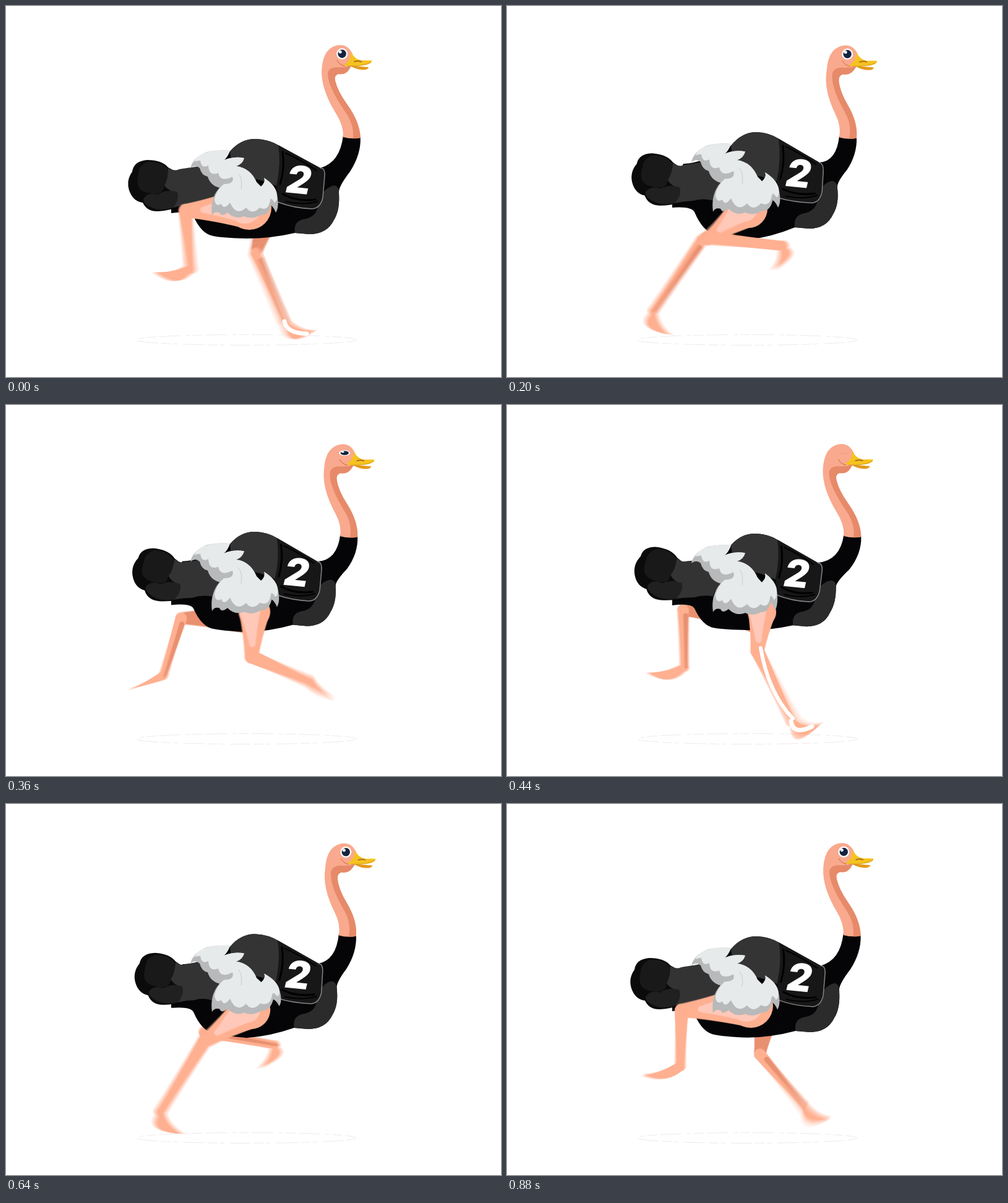
Recreate the animation shown at these times as an HTML page with a canvas. Size 800 px wide and 600 px high, loop 920 ms.

```html
<!DOCTYPE html>
<html lang="en">
<head>
<meta charset="utf-8">
<title>Running ostrich</title>
<style>
  html, body { margin: 0; width: 100%; height: 100%; overflow: hidden; background: #fff; }
  canvas { display: block; }
</style>
</head>
<body>
<canvas id="stage" width="800" height="600"></canvas>
<script>
const W = 800, H = 600, LOOP = 920, STEP = 40;
const SKIN = '#f9a98d', SHADE = '#e68a69', LIGHT = '#fac6b2';
const ctx = document.getElementById('stage').getContext('2d');

const newLayer = () => {
  const c = document.createElement('canvas');
  c.width = W;
  c.height = H;
  return c.getContext('2d');
};
const sum = newLayer(), pass = newLayer();

// time, hip x y r, hock x y, ankle x y, sole x y, toe x y
const STRIDE = [
  [0,   393, 326, 36, 290, 331, 298, 425, 275, 458, 239, 430],
  [60,  395, 328, 33, 307, 341, 368, 411, 350, 440, 302, 432],
  [200, 390, 328, 31, 326, 375, 446, 388, 474, 402, 429, 428],
  [270, 390, 333, 28, 371, 403, 492, 396, 520, 392, 524, 431],
  [420, 410, 335, 24, 409, 405, 480, 488, 480, 528, 524, 508],
  [440, 412, 335, 23, 404, 397, 460, 511, 462, 562, 507, 515],
  [460, 412, 335, 23, 404, 400, 451, 510, 455, 556, 500, 525],
  [520, 398, 340, 27, 352, 415, 356, 512, 372, 560, 418, 526],
  [660, 395, 332, 32, 315, 379, 236, 494, 208, 522, 264, 532],
  [730, 388, 338, 31, 291, 363, 223, 463, 196, 462, 181, 499],
  [880, 394, 326, 36, 282, 334, 280, 424, 255, 454, 218, 438]
];

// time, hump, belly, rump, chest x, tail x y, feather tip
const BOB = [
  [0,   0,   0,   0,   0, 0, 0,   0],
  [200, -11, 3,   -9,  -3, 3, -14, 2],
  [280, -12, -3,  -11, -3, 4, -18, 6],
  [440, -7,  -12, -11, -8, 7, -25, -3],
  [520, -2,  -5,  -7,  -7, 9, -19, -4],
  [720, -6,  6,   -4,  0,  9, -6,  10],
  [880, -1,  2,   0,   -1, 2, 0,   1]
];

const clamp = v => Math.max(0, Math.min(1, v));
const mix = (a, b, k) => a + (b - a) * k;
const mixPt = (a, b, k) => [mix(a[0], b[0], k), mix(a[1], b[1], k)];

// Smooth periodic interpolation through rows of keys
function sample(keys, time) {
  const n = keys.length, t = ((time % LOOP) + LOOP) % LOOP;
  let i = n - 1;
  while (keys[i][0] > t) i--;
  const row = j => keys[(j + n) % n];
  const at = j => row(j)[0] + Math.floor(j / n) * LOOP;
  const [t0, t1, t2, t3] = [at(i - 1), at(i), at(i + 1), at(i + 2)];
  const d = t2 - t1, k = (t - t1) / d, k2 = k * k, k3 = k2 * k;
  return row(i).slice(1).map((b, j) => {
    const a = row(i - 1)[j + 1], c = row(i + 1)[j + 1], e = row(i + 2)[j + 1];
    const m1 = (c - a) / (t2 - t0) * d, m2 = (e - b) / (t3 - t1) * d;
    return b * (2 * k3 - 3 * k2 + 1) + m1 * (k3 - 2 * k2 + k) +
           c * (3 * k2 - 2 * k3) + m2 * (k3 - k2);
  });
}

function disc(g, [x, y], r, color) {
  g.fillStyle = color;
  g.beginPath();
  g.arc(x, y, Math.max(r, 0), 0, 7);
  g.fill();
}

// Tapered limb between two round ends; pinch narrows the middle
function taper(g, a, ra, b, rb, color, pinch = 1) {
  const len = Math.hypot(b[0] - a[0], b[1] - a[1]) || 1;
  const nx = -(b[1] - a[1]) / len, ny = (b[0] - a[0]) / len;
  const m = mixPt(a, b, .55), rm = mix(ra, rb, .55) * pinch;
  disc(g, a, ra, color);
  disc(g, b, rb, color);
  g.beginPath();
  g.moveTo(a[0] + nx * ra, a[1] + ny * ra);
  g.quadraticCurveTo(m[0] + nx * rm, m[1] + ny * rm, b[0] + nx * rb, b[1] + ny * rb);
  g.lineTo(b[0] - nx * rb, b[1] - ny * rb);
  g.quadraticCurveTo(m[0] - nx * rm, m[1] - ny * rm, a[0] - nx * ra, a[1] - ny * ra);
  g.fill();
}

function joints(phase) {
  const [hx, hy, r, kx, ky, ax, ay, cx, cy, tx, ty] = sample(STRIDE, phase);
  return { hip: [hx, hy], r, hock: [kx, ky], ankle: [ax, ay], sole: [cx, cy], toe: [tx, ty] };
}

function drawFoot(g, { ankle, sole, toe }, r) {
  const len = Math.hypot(toe[0] - ankle[0], toe[1] - ankle[1]) || 1;
  let nx = -(toe[1] - ankle[1]) / len * r, ny = (toe[0] - ankle[0]) / len * r;
  if (nx * (sole[0] - ankle[0]) + ny * (sole[1] - ankle[1]) < 0) { nx = -nx; ny = -ny; }
  const top = mixPt(mixPt(ankle, toe, .5), sole, .2);
  disc(g, ankle, r, SKIN);
  g.beginPath();
  g.moveTo(ankle[0] + nx, ankle[1] + ny);
  g.quadraticCurveTo(...sole, ...toe);
  g.quadraticCurveTo(...top, ankle[0] - nx, ankle[1] - ny);
  g.fill();
}

function drawLeg(g, phase, far) {
  const leg = joints(phase), size = far ? .85 : 1;
  const { hock, ankle } = leg, r = leg.r * size;
  const hip = far ? [leg.hip[0] + 8, leg.hip[1] + 12] : leg.hip;
  taper(g, hip, r, hock, 11 * size, far ? SHADE : SKIN, .82);
  if (!far) taper(g, [hip[0] - 7, hip[1] - 1], r - 9, mixPt(hip, hock, .72), 5, LIGHT, .9);
  taper(g, hock, 11 * size, ankle, 8 * size, SKIN, .85);
  drawFoot(g, leg, 8.5 * size);
  if (far) {
    const inner = mixPt(hock, ankle, .1);
    taper(g, [inner[0] + 4, inner[1]], 4, [ankle[0] + 3, ankle[1]], 2, SHADE);
  }
}

// Average of several moments gives the motion blur
function blurLeg(phase, far) {
  const n = 8, shutter = 13;
  sum.clearRect(0, 0, W, H);
  sum.globalCompositeOperation = 'lighter';
  sum.globalAlpha = 1 / n;
  for (let i = 0; i < n; i++) {
    pass.clearRect(0, 0, W, H);
    drawLeg(pass, phase + (i / (n - 1) - .5) * shutter, far);
    sum.drawImage(pass.canvas, 0, 0);
  }
  ctx.drawImage(sum.canvas, 0, 0);
  if (Math.abs(phase % LOOP - 450) < 15) footGlare(joints(phase), far);
}

function footGlare({ hock, ankle, sole, toe }, far) {
  ctx.strokeStyle = '#fff';
  ctx.lineCap = 'round';
  ctx.lineWidth = 7;
  ctx.beginPath();
  ctx.moveTo(ankle[0] - 1, ankle[1]);
  ctx.quadraticCurveTo(ankle[0] + 2, sole[1] - 27, toe[0] - 14, toe[1] + 5);
  ctx.stroke();
  if (far) return;
  ctx.lineWidth = 6;
  ctx.beginPath();
  ctx.moveTo(hock[0] + 6, hock[1] - 4);
  ctx.quadraticCurveTo(hock[0] + 18, hock[1] + 68, ankle[0] + 2, ankle[1] - 4);
  ctx.stroke();
}

// Path whose points all pass through a warp
const bend = (d, warp) => new Path2D(
  d.replace(/([\d.]+),([\d.]+)/g, (_, x, y) => warp(+x, +y).join(',')));

function paint(d, warp, color) {
  ctx.fillStyle = color;
  ctx.fill(bend(d, warp));
}

function line(d, warp, color, width) {
  ctx.strokeStyle = color;
  ctx.lineWidth = width;
  ctx.lineCap = 'round';
  ctx.stroke(bend(d, warp));
}

function makeWarps(t) {
  const [hump, belly, rump, chest, tailX, tailY, tip] = sample(BOB, t);
  const lean = (1 - Math.cos((t - 20) / 460 * 2 * Math.PI)) / 2;
  const body = (x, y) => {
    const w = clamp((x - 500) / 45) * clamp((320 - y) / 70);
    const low = mix(belly, rump, clamp((x - 400) / 65));
    const dy = mix(rump, mix(hump, low, clamp((y - 215) / 160)), clamp((x - 270) / 130));
    const dx = chest * clamp((x - 380) / 150);
    return [x + mix(dx, -9 * lean, w), y + dy * (1 - w)];
  };
  // The tail swings up about its root
  const swing = -tailY * .006;
  const tail = (x, y) => {
    const rx = x - 290, ry = y - 300;
    const lifted = [x + tailX - ry * swing, y + tailY * .4 + rx * swing];
    return mixPt(body(x, y), lifted, clamp((330 - x) / 60));
  };
  const plume = (x, y) => {
    const k = clamp((x - 405) / 30) * clamp((y - 275) / 50);
    return [x + tip * k, y + hump * (1 - .45 * clamp((y - 235) / 105)) - tip * k * .8];
  };
  const neck = (x, y) => [x + mix(8, -9, clamp((y - 100) / 112)) * lean, y + .5 * lean];
  return { body, tail, plume, neck };
}

function drawGround() {
  ctx.strokeStyle = '#e2e2e2';
  ctx.lineWidth = .7;
  ctx.lineCap = 'butt';
  ctx.setLineDash([16, 5, 34, 9, 7, 4]);
  ctx.beginPath();
  ctx.ellipse(388, 540, 178, 8.5, 0, 0, 2 * Math.PI);
  ctx.stroke();
  ctx.setLineDash([]);
}

function drawBody({ body, tail }) {
  paint('M545,210 Q559,216 573,213 Q574,240 556,268 Q539,290 538,300 Q540,330 530,346 ' +
        'Q519,369 490,369 L467,367 Q428,376 389,376 Q350,375 335,372 Q316,369 303,340 ' +
        'Q298,331 267,335 L267,300 L285,264 Q320,262 362,235 Q380,214 405,215 ' +
        'Q425,216 440,225 L508,262 Q540,253 545,210Z', body, '#050507');
  paint('M467,367 Q464,349 480,345 Q504,342 505,318 Q512,294 531,290 Q539,292 538,304 ' +
        'Q540,330 530,346 Q519,369 490,369Z', body, '#2b2b2c');
  paint('M300,262 L273,267 L262,261 Q252,249 228,249 Q206,251 204,268 Q194,282 199,298 ' +
        'Q205,316 221,318 Q228,333 246,332 Q262,331 280,325 L305,320Z', tail, '#0b0b0b');
  paint('M262,264 Q250,250 228,252 Q213,260 214,272 Q206,301 235,303 Q255,306 256,290 ' +
        'Q262,280 262,264Z', tail, '#191919');
  paint('M222,312 Q230,300 245,305 Q258,296 276,300 Q284,315 270,326 Q245,334 228,322 ' +
        'Q222,318 222,312Z', tail, '#202020');
  paint('M262,262 Q272,268 280,264 Q292,262 300,261 L340,255 L360,294 Q335,305 333,320 ' +
        'Q315,316 300,321 Q284,322 270,326 Q282,312 276,300 Q262,300 256,290 ' +
        'Q262,280 262,262Z', tail, '#333');
  paint('M362,235 Q380,214 405,215 Q425,216 441,226 Q446,260 437,291 L412,282 L395,278 ' +
        'L365,262Z', body, '#343434');
}

function drawJersey({ body }) {
  paint('M440,225 L508,262 Q516,262 515,275 L512,310 Q508,327 495,328 Q465,327 439,317 ' +
        'L437,290 Q445,255 440,225Z', body, '#171717');
  line('M447,236 Q451,262 443,288', body, '#000', 3);
  line('M452,238 Q475,248 502,266', body, '#000', 2);
  line('M447,304 Q470,317 500,313', body, '#000', 3);
  line('M452,316 Q480,323 504,316', body, '#000', 2);
  line('M508,262 Q516,262 515,275 L512,310 Q508,327 495,328 Q465,327 439,317', body, '#858585', 1.5);
  const [x, y] = body(474, 281);
  ctx.save();
  ctx.transform(1, .1, -.24, 1, x, y);
  ctx.font = '900 61px Inter, sans-serif';
  ctx.textAlign = 'center';
  ctx.fillStyle = '#fff';
  ctx.fillText('2', 0, 22);
  ctx.restore();
}

function drawPlume({ plume }) {
  const top = 'Q345,232 362,234 Q356,250 346,252 Q366,242 385,246 Q382,256 372,259 ' +
              'Q395,262 405,285 L412,292 Q420,285 417,278 Q436,290 438,305 ';
  paint('M298,262 Q302,245 325,236 ' + top + 'Q442,325 436,334 Q433,326 428,322 ' +
        'Q424,339 412,338 Q396,346 385,340 Q370,346 358,334 Q348,342 345,334 ' +
        'Q336,332 333,339 Q329,312 345,294 Q330,290 326,276 Q316,274 313,262 ' +
        'Q306,256 298,262Z', plume, '#b8b9ba');
  paint('M304,252 Q310,240 327,236 ' + top + 'Q439,315 434,318 Q428,308 427,314 ' +
        'Q424,333 410,326 Q398,339 388,326 Q372,341 362,318 Q352,331 348,320 ' +
        'Q338,326 337,312 Q340,298 352,288 Q370,288 366,276 Q346,286 343,270 ' +
        'Q328,276 327,258 Q316,264 314,250 Q308,250 304,252Z', plume, '#e7eaeb');
  line('M376,272 Q383,280 380,296', plume, '#c9cbcc', 1);
}

// Share of the eye that stays open
const openEye = t => t === 400 || t === 440 ? 0 : t === 360 || t === 480 ? .5 : 1;

function drawHead({ neck }, t) {
  paint('M541,63 Q554,64 560,78 Q562,95 554,103 Q549,112 537,110 Q530,112 532,121 ' +
        'Q536,138 552,160 Q572,188 573,213 Q559,216 545,212 Q546,194 534,175 ' +
        'Q509,135 510,104 Q512,64 541,63Z', neck, SKIN);
  paint('M557,97 Q552,112 537,110 Q530,112 532,121 Q536,138 552,160 Q572,188 573,213 ' +
        'Q567,215 561,214 Q563,192 549,172 Q519,129 520,108 Q522,99 535,99 ' +
        'Q546,100 557,97Z', neck, SHADE);
  paint('M555,96 L586,99 Q585,104 574,103 Q564,102 555,96Z', neck, '#e39a1c');
  paint('M558,75 Q563,86 574,88 L591,88 Q591,94 578,96 Q556,98 545,96 Q557,90 558,75Z',
        neck, '#f5c31f');
  line('M552,97 Q578,98 590,91', neck, '#c98a1c', .7);
  line('M563,90 Q569,88 574,90', neck, '#b06f22', 2);
  line('M535,88 Q538,95 547,97', neck, '#c9694a', 1);

  const [x, y] = neck(543, 77.3), open = openEye(t);
  ctx.save();
  ctx.translate(x, y);
  if (open) {
    ctx.scale(1, open);
    disc(ctx, [0, 0], 9, '#fff');
    disc(ctx, [0, 0], 6.7, '#14233f');
    disc(ctx, [-3, -3], 2.5, '#fff');
  } else {
    ctx.strokeStyle = '#ec9c80';
    ctx.lineWidth = 1;
    ctx.beginPath();
    ctx.moveTo(-6, 1);
    ctx.quadraticCurveTo(1, 3, 7, 0);
    ctx.stroke();
  }
  ctx.restore();
}

function draw(t) {
  const warps = makeWarps(t);
  ctx.fillStyle = '#fff';
  ctx.fillRect(0, 0, W, H);
  drawGround();
  blurLeg(t + LOOP / 2, true);
  drawBody(warps);
  drawJersey(warps);
  drawHead(warps, t);
  blurLeg(t, false);
  drawPlume(warps);
}

let shown = -1;
function tick() {
  const t = Math.floor(performance.now() % LOOP / STEP) * STEP;
  if (t !== shown) draw(shown = t);
  requestAnimationFrame(tick);
}
tick();
</script>
</body>
</html>
```
